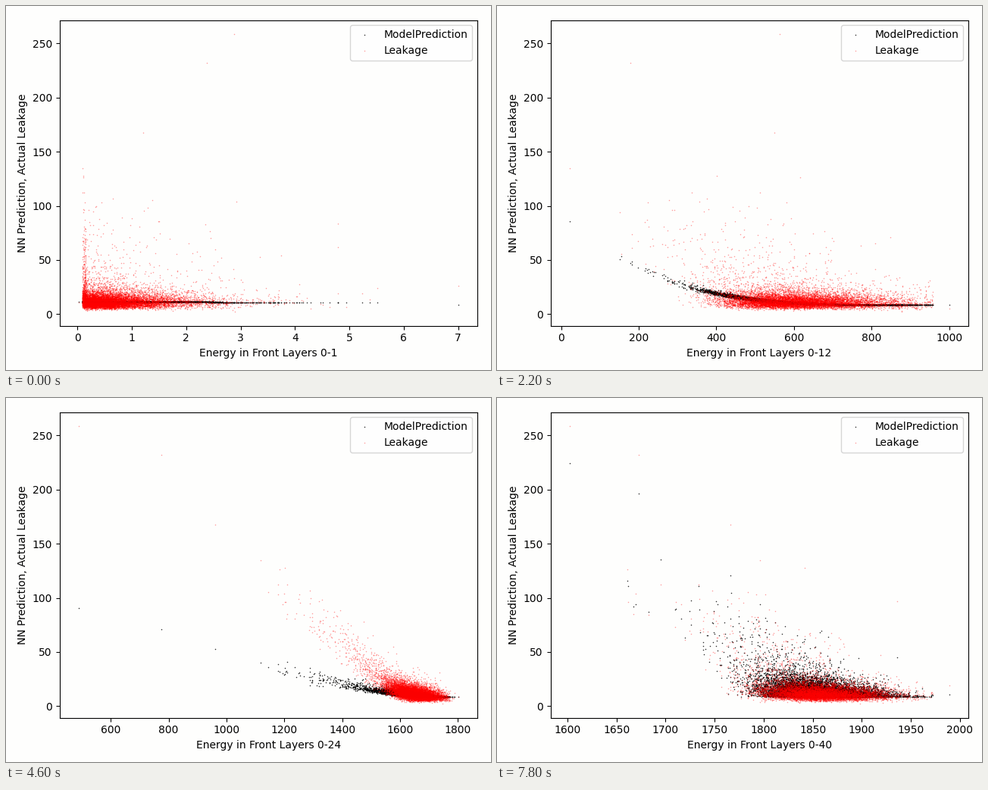
Write a matplotlib script that moves like this. It is 640x480 px and loops after 8000 ms.

```python
import numpy as np
import matplotlib.pyplot as plt
from matplotlib.animation import FuncAnimation

W, H, DPI = 640, 480, 100
FRAMES, STEP = 40, 200
LEFT, RIGHT, TOP, BOTTOM = 70.6, 621.6, 18.55, 421.6
N = 10000
FLOOR = 8.4
rng = np.random.default_rng(7)

# layer, energy: low, middle, spread, high; prediction: height, power
KEYS = np.array([
    [1, .02, .80, .62, 7, 3, .2],
    [7, 4.9, 132, 45, 332, 36, 4],
    [12, 21.5, 632, 112, 1000, 77, 4],
    [20, 237.5, 1475, 67, 1682, 70, 2],
    [28, 1033, 1790, 28, 1896, 80, 1.5],
    [34, 1368, 1853, 30, 1965, 220, 2.3],
    [40, 1602, 1866, 31, 1989, 190, 3],
])
LAYERS, HEIGHT, POWER = KEYS[:, 0], KEYS[:, 5], KEYS[:, 6]


def make_leakage():
    y = 11.3 * np.exp(.34 * rng.normal(size=N))
    tail = rng.random(N) < .1
    y[tail] = 13 + rng.exponential(19, tail.sum())
    y[:3] = 258.6, 232, 167.5
    y[-1] = 2.2
    return np.maximum(y, 2.2)


def skewed(z, k):
    """Gamma-like unit noise of shape k from normal noise."""
    g = k * np.maximum(1 - 1 / (9 * k) + z / (3 * np.sqrt(k)), 0) ** 3
    return (g - k) / np.sqrt(k)


def make_energy(y, rho=.75):
    """Energy per knot: leaky showers start late and deposit less."""
    lag = np.clip((y - 8) / 250, 0, 1) ** .85
    grow = 1 + .006 * np.maximum(y - 12, 0)
    z = rng.normal(size=N)
    rows = []
    for layer, low, mid, sd, high in KEYS[:, :5]:
        x = mid - (mid - low) * lag + sd * grow * skewed(z, 1.3 * layer)
        span, r = high - low, rng.random(N)
        x = np.where(x < low + .01 * span, low + span * (.01 + .01 * r), x)
        x = np.where(x > high - .04 * span, high - span * (.04 + .1 * r), x)
        x[x.argmin()], x[x.argmax()] = low, high
        rows.append(x)
        z = rho * z + np.sqrt(1 - rho ** 2) * rng.normal(size=N)
    return np.array(rows)


def slopes(t, p):
    """Monotone cubic tangents along the first axis."""
    d = np.diff(p, axis=0) / np.diff(t)[:, None]
    a, b = d[:-1], d[1:]
    same = a * b > 0
    inner = np.where(same, 2 * a * b / np.where(same, a + b, 1), 0)
    return np.vstack([d[:1], inner, d[-1:]])


leak = make_leakage()
T = np.log(LAYERS)
P = np.log(make_energy(leak))
M = slopes(T, P)
jitter = rng.normal(size=N)


def energy(layer):
    i = min(np.searchsorted(LAYERS, layer, side="right") - 1, len(LAYERS) - 2)
    h = T[i + 1] - T[i]
    s = (np.log(layer) - T[i]) / h
    return np.exp((1 + 2 * s) * (1 - s) ** 2 * P[i] + s * (1 - s) ** 2 * h * M[i]
                  + s * s * (3 - 2 * s) * P[i + 1] + s * s * (s - 1) * h * M[i + 1])


def predict(x, layer):
    """Blend an energy-only estimate with the true leakage."""
    u = (x - x.min()) / np.ptp(x)
    height, power = (np.interp(layer, LAYERS, c) for c in (HEIGHT, POWER))
    base = np.maximum(height * (1 - u) ** power, .1)
    true = np.maximum(leak - FLOOR, .3)
    mix = .75 * max(layer - 20, 0) / 20
    excess = base ** (1 - mix) * true ** mix
    sd = .6 * (layer / 40) ** 1.3 / (1 + excess / 30)
    return FLOOR + excess * np.exp(sd * jitter)


def padded(lo, hi):
    m = .05 * (hi - lo)
    return lo - m, hi + m


fig = plt.figure(figsize=(W / DPI, H / DPI), dpi=DPI, facecolor="#fefefd")
ax = fig.add_axes([LEFT / W, 1 - BOTTOM / H, (RIGHT - LEFT) / W, (BOTTOM - TOP) / H],
                  facecolor="#fefefd")
black = ax.scatter([], [], s=.6, c="black", lw=.35, alpha=.7, label="ModelPrediction")
red = ax.scatter([], [], s=.5, c="red", lw=.5, alpha=.25, label="Leakage")
ax.set_ylabel("NN Prediction, Actual Leakage")
ax.legend(loc="upper right")


def update(k):
    layer = k + 1
    x = energy(layer)
    pred = predict(x, layer)
    black.set_offsets(np.column_stack([x, pred]))
    red.set_offsets(np.column_stack([x, leak]))
    ax.set_xlim(padded(x.min(), x.max()))
    ax.set_ylim(padded(leak.min(), max(leak.max(), pred.max())))
    ax.set_xlabel(f"Energy in Front Layers 0-{layer}")
    return black, red


anim = FuncAnimation(fig, update, frames=FRAMES, interval=STEP,
                     init_func=lambda: update(0), repeat=True, repeat_delay=0)
plt.show()
```
